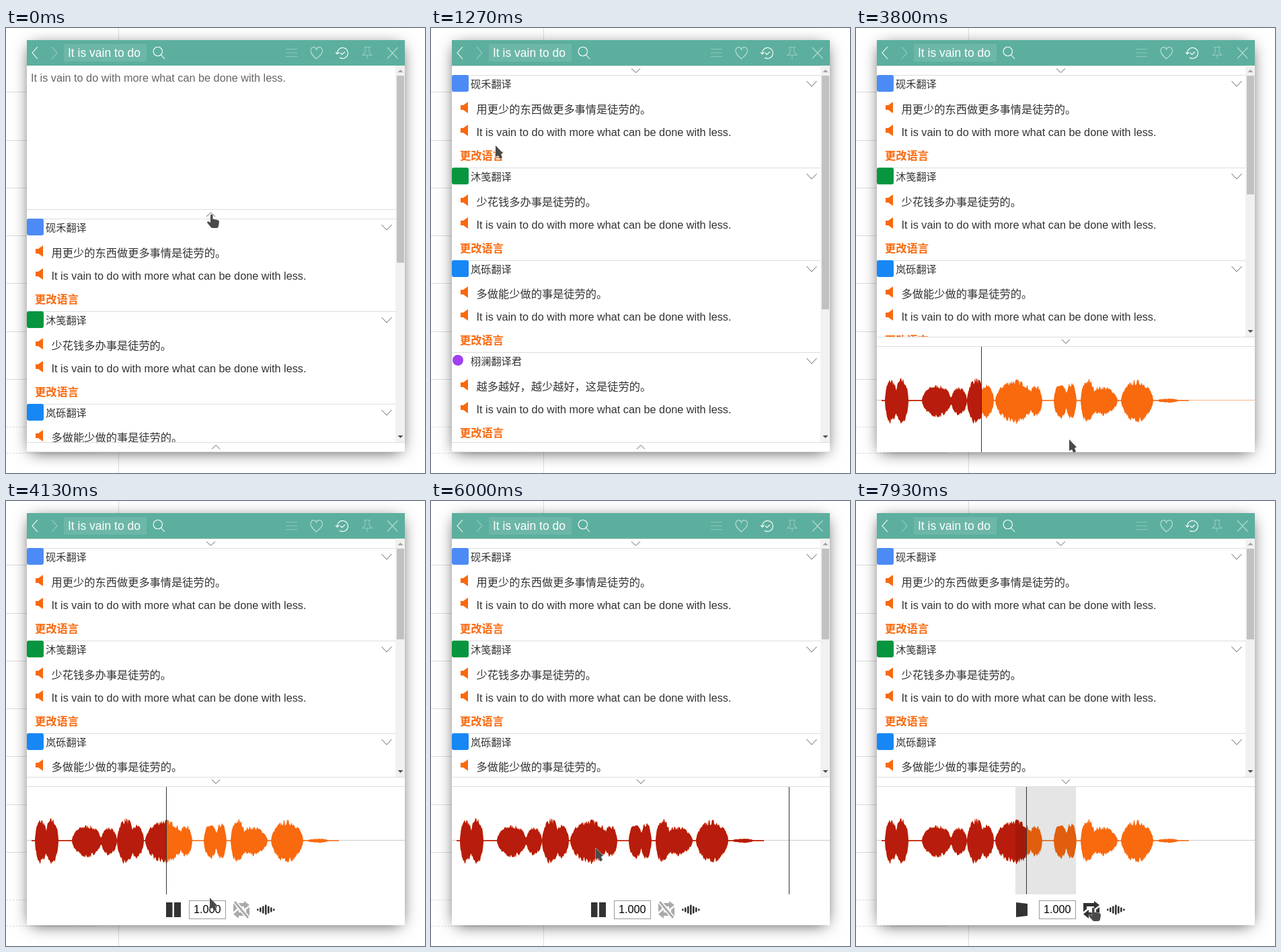
Animation, 623 px wide and 663 px high, one loop 8000 ms. Source, as an HTML page:

```html
<!DOCTYPE html>
<html lang="zh">
<head>
<meta charset="utf-8">
<title>Translation panel</title>
<style>
html, body { margin: 0; width: 100%; height: 100%; overflow: hidden; background: #fff; }
svg { display: block; }
text { font: 16.24px "Liberation Sans", "Noto Sans CJK SC", sans-serif; fill: #333; white-space: pre; }
.window { position: absolute; left: 31px; top: 18px; width: 562px; height: 614px; background: #fff;
  box-shadow: 0 4px 23px -6px rgba(0,0,0,.8); }
#stage { position: absolute; left: 0; top: 0; }
.rule { fill: #ddd; }
.icon { fill: none; stroke: #fff; stroke-width: 1.1; }
.chevron { fill: none; stroke: #666; }
.orange { fill: #f9690e; }
.dark { fill: #333; }
</style>
</head>
<body>
<svg width="623" height="663" id="back"></svg>
<div class="window"></div>
<svg width="623" height="663" id="stage"></svg>
<script>
const $ = id => document.getElementById(id);
const set = (id, attrs) => { for (const k in attrs) $(id).setAttribute(k, attrs[k]); };
const show = (id, on) => set(id, { visibility: on ? 'visible' : 'hidden' });
const clamp = v => Math.max(0, Math.min(1, v));
const easeOut = p => 1 - (1 - clamp(p)) ** 2;
const range = n => [...Array(n).keys()];

const rect = (x, y, w, h, more = '') => `<rect x="${x}" y="${y}" width="${w}" height="${h}" ${more}/>`;
const rule = (x, y, w) => rect(x, y, w, 1, 'class="rule"');
const text = (x, y, s, more = '') => `<text x="${x}" y="${y}" ${more}>${s}</text>`;
const path = (d, more = '') => `<path d="${d}" ${more}/>`;
const icon = (d, opacity) => path(d, `class="icon" opacity="${opacity}"`);

// Page behind the window
$('back').innerHTML = range(7).map(i => rule(0, Math.round(95.2 + 71.3 * i), 168)).join('') +
  rect(167, 0, 1, 663, 'class="rule"') +
  path('M0 594.5H136M0 633.5H136', 'stroke="#ddd" stroke-dasharray="3 2"');

const header = rect(31, 18, 562, 38, 'fill="#5caf9e"') +
  icon('M47 28l-8 9 8 9', 1) + icon('M68 28l8 9-8 9', .4) +
  rect(86, 24, 123, 26, 'fill="#fff" opacity=".1"') +
  text(92, 43, 'It is vain to do', 'style="font-size:17.5px;fill:#fff"') +
  icon('M232.5 35a6.7 6.7 0 1 0-13.4 0a6.7 6.7 0 1 0 13.4 0M230.5 40l5.5 6', 1) +
  icon('M416 31.5h17M416 37h17M416 42.5h17', .3) +
  icon('M461.5 46C456 41 453 38 453 34C453 27.5 460 27 461.5 32C463 27 470.5 27.5 470.5 34C470.5 38 467 41 461.5 46Z', .6) +
  icon('M492.5 38a8 8 0 1 1 3.500 6M490 36l2.500 3 3-3M497 37l2.500 2.500 4.500-4', 1) +
  icon('M532 28.5h10M534 28.5v8l-4 4h14l-4-4v-8M537 41v5', .35) +
  icon('M567 29l15.5 16.5M582.5 29L567 45.5', .55);

// Translation results
const sentence = 'It is vain to do with more what can be done with less.';
const services = [
  ['砚禾翻译', '用更少的东西做更多事情是徒劳的。', '#4c8bf5'],
  ['沐笺翻译', '少花钱多办事是徒劳的。', '#07963f'],
  ['岚砾翻译', '多做能少做的事是徒劳的。', '#1787f5'],
  ['栩澜翻译君', '越多越好，越少越好，这是徒劳的。', '#a040f0'],
];
const speaker = y => path(`M44 ${y - 3.5}h4l7-5v17l-7-5h-4z`, 'class="orange"');
const results = services.map(([name, line, color], i) => {
  const top = 70 + Math.round(137.75 * i), y = 70 + Math.round(137.6 * i);
  const badge = i == 3 ? `<circle cx="40" cy="${top + 12}" r="8" fill="${color}"/>`
    : rect(31, top, 25, 25, `rx="3" fill="${color}"`);
  return rule(31, top, 548) + badge +
    text(59, top + 19, name, 'style="font-size:15.2px"') +
    path(`M558.5 ${top + 9}l7.5 8 7.5-8`, 'class="chevron"') +
    speaker(y + 48.5) + text(67.5, y + 57, line) +
    speaker(y + 82.5) + text(67.5, y + 91, sentence) +
    text(43, y + 126, '更改语言', 'style="font-weight:bold;fill:#f9690e"');
}).join('');

// Speech bursts: centre, half width, height
const bursts = [
  [52, 9, 32], [68, 10, 33], [120, 22, 23], [153, 12, 20], [178, 13, 33], [195, 10, 24], [236, 29, 31],
  [267, 10, 23], [304, 10, 25], [320, 8, 26], [345, 11, 32], [366, 23, 21], [418, 24, 30], [464, 16, 3],
];
let seed = 7;
const random = () => (seed = seed * 16807 % 2147483647) / 2147483647;
const heightAt = x => Math.max(.8, ...bursts.map(([c, w, h]) => h * clamp(1 - ((x - c) / w) ** 2) ** .6));
const samples = range(458).map(i => [38 + i, heightAt(38 + i)]);
const outline = (side, gain) => samples.map(([x, h]) => `L${x} ${506 + side * h * (gain + .3 * random())}`);
const wave = 'M38 506' + outline(-1, .75).join('') + outline(1, .83).reverse().join('') + 'Z';

const soundBars = range(7).map(i => {
  const h = 15 - 4 * Math.abs(i - 3);
  return rect(373 + 4 * i, 609 - h / 2, 2.6, h, 'class="dark" rx="1"');
}).join('');
const player = rect(31, 411, 562, 230, 'fill="#fff"') + rule(31, 411, 562) + rule(31, 425, 562) +
  path('', 'class="chevron" id="panelChevron"') +
  rect(31, 505, 562, 1, 'id="axis"') +
  path(wave, 'class="orange"') + path(wave, 'fill="#b71c0c" clip-path="url(#playedClip)"') +
  rect(237, 426, 0, 160, 'id="region" fill="#000" opacity=".1"') +
  rect(0, 426, 1, 160, 'id="playhead" class="dark"') +
  path('', 'id="playButton" class="dark"') +
  rect(272.5, 595.5, 54, 27, 'fill="#fff" stroke="#999"') +
  text(279, 614, '1.000', 'style="fill:#000"') +
  '<g id="loop">' +
  path('M338 612V599H354V596L362 602L354 608V604H343V608ZM362 605V618H346V622L338 615.5L346 609V613H357V609Z') +
  '<g id="slash">' + path('M340 597L360 621', 'stroke="#fff" stroke-width="6"') +
  path('M340 597L360 621', 'stroke="#aaa" stroke-width="3"') + '</g></g>' + soundBars;

$('stage').innerHTML = `<defs>
  <clipPath id="windowClip">${rect(31, 18, 562, 614)}</clipPath>
  <clipPath id="inputClip">${rect(31, 56, 548, 0, 'id="inputBox"')}</clipPath>
  <clipPath id="playedClip">${rect(31, 426, 0, 160, 'id="played"')}</clipPath></defs>
  <g clip-path="url(#windowClip)">
  <g clip-path="url(#inputClip)">${text(37, 80, sentence, 'style="fill:#666"')}
    <g id="spinner">${rect(564, 56, 14, 8, 'fill="#eee"') + path('M568 62h8l-4-4z', 'fill="#999"')}</g></g>
  <g id="list">${rule(31, 56, 548)}${path('', 'class="chevron" id="inputChevron"')}${results}
    ${path('M56 148q5 4 0 8', 'id="sound0" fill="none" stroke="#f9690e" opacity=".75"')}
    ${path('M59 145.5q5 6.5 0 13', 'id="sound1" fill="none" stroke="#f9690e" opacity=".75"')}</g>
  ${rect(579, 56, 14, 576, 'fill="#f1f1f1"') + path('M582.5 66h8l-4-4z', 'fill="#a3a3a3"')}
  ${rect(581, 71, 11, 0, 'id="thumb" fill="#c1c1c1"')}${path('M582.5 0h8l-4 4z', 'id="downArrow" fill="#505050"')}
  <g id="player">${player}</g>${header}</g>
  ${path('', 'id="cursor" fill="#4a4a4a" stroke="#fff" stroke-opacity=".8" paint-order="stroke"')}`;

const arrow = 'M0 0L11 11.5L8 13L10 18L6.5 20L4 15L0 17Z';
const hand = 'M3 2q1.5-3 3.5 0v5.500l7 1.500q2.500.5 2.500 3l-1 6q-.5 3-3 3h-6q-2 0-3-2l-5-6q0-2.500 2.500-1.500l2.500 1.500z';

// Pointer stops: time, x, y
const stops = [
  [0, 301, 277], [733, 301, 277], [1667, 50, 152], [2532, 50, 152], [2533, 253, 447], [2933, 317, 597],
  [3400, 316, 622], [3733, 316, 622], [3800, 317, 613], [4867, 290, 571], [6000, 245, 517],
  [6270, 237, 516], [6933, 327, 518], [7533, 348, 605], [8000, 348, 605],
];
function pointerAt(t) {
  const i = stops.findIndex(s => s[0] > t), [t0, x0, y0] = stops[i - 1], [t1, x1, y1] = stops[i];
  const e = easeOut((t - t0) / (t1 - t0));
  return [Math.round(x0 + (x1 - x0) * e), Math.round(y0 + (y1 - y0) * e)];
}

// Playback runs once through, then twice from the start of the region
const SPEED = .1575, BEGIN = 2816, END = 6384, REPLAY = 6960, STOP = 7530, LOOP = 7830;
function playheadAt(t) {
  if (t < REPLAY) return Math.min(592, 31 + SPEED * Math.max(0, t - BEGIN));
  return Math.min(327, 237 + SPEED * (t - (t < LOOP ? REPLAY : LOOP)));
}
function pauseShape(t) {
  const ramp = start => clamp((t - start) / 125);
  const playing = t < REPLAY ? 1 - ramp(END) : t < LOOP ? ramp(REPLAY) - ramp(STOP) : ramp(LOOP);
  if (playing == 1) return 'M238 598h9.5v22h-9.5zM250 598h10v22h-10z';
  const cut = 11 * (1 - playing);
  return `M238 598L255 ${598 + cut}V${620 - cut}L238 620Z`;
}

function draw(t) {
  const open = 213.5 * (1 - easeOut((t - 560) / 216)), shift = Math.round(open);
  set('inputBox', { height: shift });
  show('spinner', shift < 30);
  set('list', { transform: `translate(0 ${shift})` });
  set('inputChevron', { d: t < 600 ? 'M298 67l6.5-6 6.5 6' : 'M298 60.5l6.5 6 6.5-6' });
  const phase = Math.floor((t - 2530) / 133) % 3, sounding = t > 2530 && t < 3390;
  show('sound0', sounding && phase != 1);
  show('sound1', sounding && phase != 2);

  const top = Math.round(617 - 206 * easeOut((t - 3640) / 312)), view = top - 56;
  set('thumb', { height: (view - 28) * view / (859 + open) });
  set('downArrow', { transform: `translate(0 ${top - 10})` });
  set('player', { transform: `translate(0 ${top - 411})` });
  set('panelChevron', { d: t < 3660 ? 'M306 421.5l6-6 6 6' : 'M306 415l6 6 6-6' });

  const x = playheadAt(t), [cx, cy] = pointerAt(t);
  set('axis', { fill: t < 4000 ? '#fcb487' : '#ccc' });
  set('played', { width: x - 31 });
  set('playhead', { x: Math.round(x) });
  set('playButton', { d: pauseShape(t) });
  set('region', { width: t < 6270 ? 0 : Math.max(0, Math.min(327, cx) - 237) });
  set('loop', { fill: t < LOOP ? '#aaa' : '#333' });
  show('slash', t < LOOP);

  const overControl = t < 660 || cx < 56 || cy > 615 || cx > 338 && cy > 590;
  set('cursor', { d: overControl ? hand : arrow, transform: `translate(${cx} ${cy})` });
}

// The screen updates 15 times a second
function tick() {
  draw(Math.floor((performance.now() % 8000 + 4) * .015) % 120 / .015);
  requestAnimationFrame(tick);
}
tick();
</script>
</body>
</html>
```
